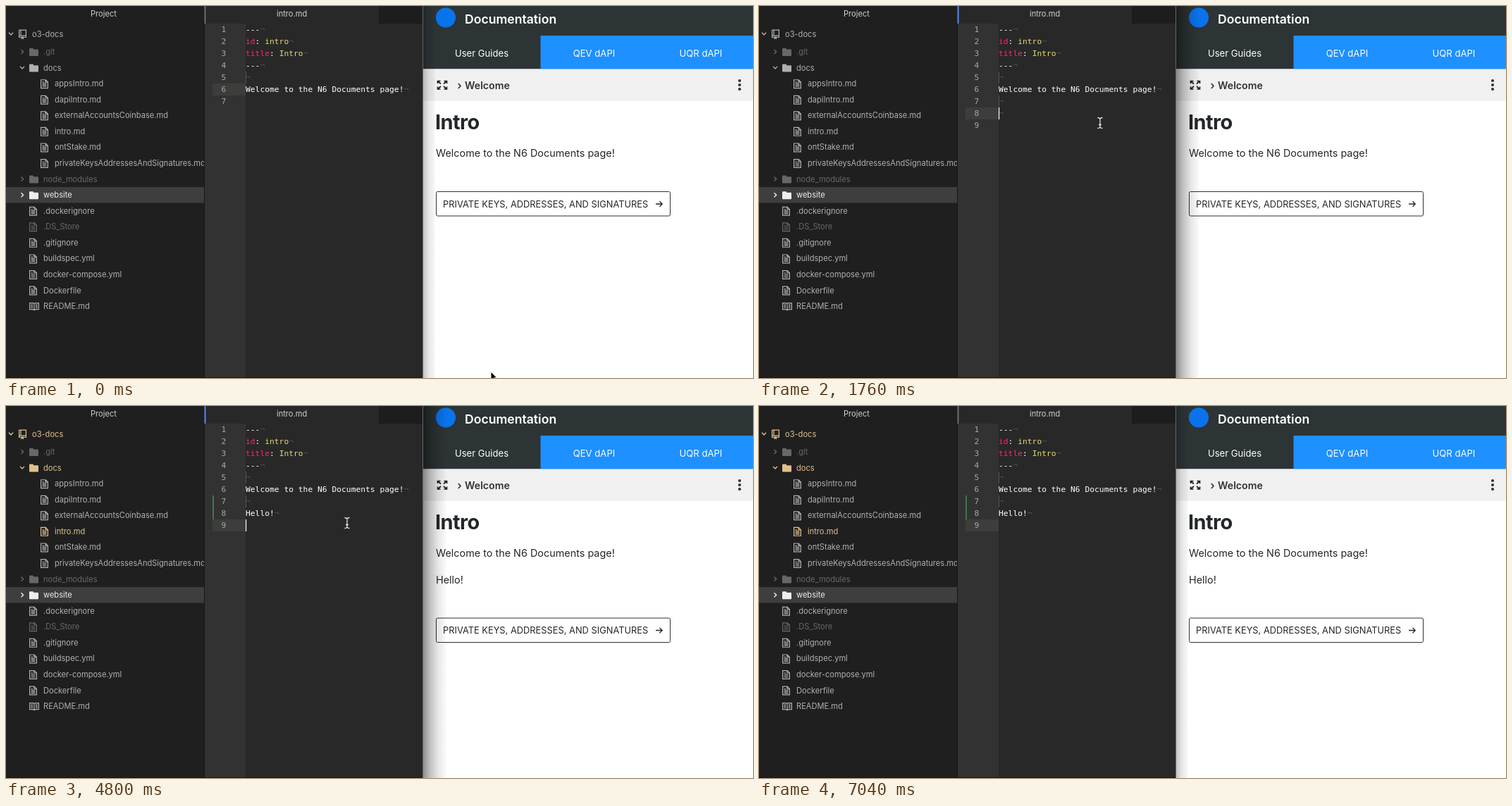
An HTML page that plays this animation: 1060 by 528 pixels, repeating every 7.12 s.

```html
<!DOCTYPE html>
<html lang="en">
<head>
<meta charset="utf-8">
<title>Live documentation preview</title>
<style>
  html, body { margin: 0; width: 100%; height: 100%; overflow: hidden; background: #fff; }
  svg { display: block; width: 1060px; height: 528px; }
  text { font-family: Inter, "Noto Sans", sans-serif; white-space: pre; }
  .ui { font-size: 11.1px; fill: #d0d0d0; }
  .code text { font-family: "DejaVu Sans Mono", monospace; font-size: 11.3px; fill: #fff; }
  .code .num { fill: #a8a8a8; text-anchor: middle; }
  .code .eol { fill: #505050; }
  .key { fill: #f92672; }
  .str { fill: #e6db74; }
  .row { color: #b0b0b0; }
  .row text { fill: currentColor; font-size: 11.1px; }
  .dim { color: #686868; }
  .sel { color: #eee; }
  .saved .mod { color: #e2c08d; }
  .page { fill: #23272a; font-size: 14.4px; }
  .tab { fill: #fff; font-size: 13.1px; text-anchor: middle; }
  .line { fill: none; stroke: currentColor; stroke-width: 1.2; }
</style>
</head>
<body>
<svg viewBox="0 0 1060 528">
  <defs>
    <linearGradient id="wide">
      <stop offset="0" stop-opacity=".44"/>
      <stop offset=".3" stop-opacity=".25"/>
      <stop offset=".65" stop-opacity=".1"/>
      <stop offset="1" stop-opacity=".02"/>
    </linearGradient>
    <linearGradient id="slim">
      <stop offset="0" stop-opacity=".24"/>
      <stop offset=".45" stop-opacity=".1"/>
      <stop offset="1" stop-opacity=".03"/>
    </linearGradient>
    <clipPath id="side"><path d="M0 0H281V528H0Z"/></clipPath>
    <path id="file" class="line" d="M.6 .6H7.2L10.4 3.8V12.4H.6Z M7 .8V4H10.2 M2.6 6H8.4 M2.6 8H8.4 M2.6 10H8.4 M2.6 4H5"/>
    <path id="folder" fill="currentColor" d="M0 2Q0 1 1 1H5Q6 1 6 2V2.6H12Q13 2.6 13 3.6V11Q13 12 12 12H1Q0 12 0 11Z"/>
    <path id="book" class="line" d="M.6 1.6H5.6L7 2.6L8.4 1.6H13.4V10.6H8.4L7 11.6L5.6 10.6H.6Z M7 2.6V11 M2.4 4H5 M2.4 6H5 M2.4 8H5 M9 4H11.6 M9 6H11.6 M9 8H11.6"/>
    <g id="repo">
      <path class="line" d="M.6 .6H10.4V11H7 M3 11H.6V.6 M3 .6V8.6 M.6 8.6H10.4"/>
      <path fill="currentColor" d="M3.4 10H7V14L5.2 12.6L3.4 14Z"/>
    </g>
    <path id="ibeam" d="M-3.5 -7.5Q0 -7.5 0 -5V5Q0 7.5 -3.5 7.5M3.5 -7.5Q0 -7.5 0 -5M0 5Q0 7.5 3.5 7.5M-2 2.5H2"/>
  </defs>

  <!-- file tree -->
  <path fill="#1f1f1f" d="M0 0H282V528H0Z"/>
  <path fill="#3e3e3e" d="M0 257H281V279.5H0Z"/>
  <text class="ui" x="120" y="15">Project</text>
  <g id="tree" clip-path="url(#side)"></g>

  <!-- editor -->
  <path fill="#282828" d="M282 0H592V528H282Z"/>
  <path fill="#1d1d1d" d="M530 0H592V25H530Z"/>
  <path fill="#323232" d="M282 25H340V528H282Z"/>
  <path fill="#171717" d="M281 0H282V528H281Z M529.5 0H530.5V25H529.5Z"/>
  <path id="edge" d="M281.5 0H283.5V25H281.5Z"/>
  <text class="ui" x="384" y="15">intro.md</text>
  <circle id="dirty" cx="516" cy="11.5" r="3.2" fill="#568af2"/>
  <g class="code">
    <rect id="active" x="293" width="47" height="17" fill="#3d3d3c"/>
    <path id="diff" fill="#43764a" d="M293 127H295V161H293Z"/>
    <g id="nums"></g>
    <g id="lines"></g>
    <rect id="caret" width="1.2" height="17" fill="#f8f8f0"/>
  </g>
  <path fill="#141414" d="M0 527H592V528H0Z"/>

  <!-- web page -->
  <path fill="#fff" d="M592 0H1060V528H592Z"/>
  <path fill="#2d3436" d="M592 0H1060V89.5H592Z"/>
  <path fill="#1e90ff" d="M758.5 42H1060V89.5H758.5Z"/>
  <path fill="#f0f0f0" d="M592 89.5H1060V134.5H592Z"/>
  <circle cx="624" cy="16.5" r="14" fill="#0a73eb"/>
  <text x="651" y="25" font-size="17.6" font-weight="600" fill="#fff">Documentation</text>
  <text class="tab" x="675" y="71.5">User Guides</text>
  <text class="tab" x="834.5" y="71.5">QEV dAPI</text>
  <text class="tab" x="986" y="71.5">UQR dAPI</text>
  <path fill="none" stroke="#222" stroke-width="1.7"
    d="M612.5 110V106.5H616.5M612.5 106.5L617 110.5 M625.5 110V106.5H621.5M625.5 106.5L621 110.5 M612.5 114.5V118H616.5M612.5 118L617 114 M625.5 114.5V118H621.5M625.5 118L621 114"/>
  <path fill="none" stroke="#333" stroke-width="1.7" d="M641.8 110L645 113.5L641.8 117"/>
  <text x="651" y="118" font-size="14.2" font-weight="600" fill="#333">Welcome</text>
  <g fill="#333"><circle cx="1041" cy="106" r="2.1"/><circle cx="1041" cy="112" r="2.1"/><circle cx="1041" cy="118" r="2.1"/></g>
  <text x="609" y="174.5" font-size="29" font-weight="700" letter-spacing="-.6" fill="#23272a">Intro</text>
  <text class="page" x="610" y="214">Welcome to the N6 Documents page!</text>
  <text class="page" id="hello" x="610" y="251.5">Hello!</text>
  <g id="next">
    <rect x="610.5" y="263.500" width="332" height="34.5" rx="2" fill="none" stroke="#2b3036"/>
    <text class="page" x="620" y="285.5" style="font-size:12.85px">PRIVATE KEYS, ADDRESSES, AND SIGNATURES</text>
    <path fill="none" stroke="#23272a" stroke-width="1.3" d="M922 281H931M927.5 277.3L931.2 281L927.5 284.7"/>
  </g>
  <path fill="#666" d="M591 0H592V528H591Z"/>
  <path id="focused" fill="url(#wide)" d="M592 0H624V528H592Z"/>
  <path id="blurred" fill="url(#slim)" d="M592 0H608.5V528H592Z"/>

  <!-- pointer -->
  <g id="mouse">
    <path id="arrow" fill="#000" stroke="#fff" d="M0 0V12L2.8 9.4L4.8 13.8L6.8 13L4.9 8.7H8.6Z"/>
    <g id="beam" fill="none">
      <use href="#ibeam" stroke="#222" stroke-width="3"/>
      <use href="#ibeam" stroke="#e4e4e4" stroke-width="1.3"/>
    </g>
    <path id="resize" fill="#000" stroke="#fff" stroke-width=".8" d="M-7 0L-2.8 -4.2V-1.3H2.8V-4.2L7 0L2.8 4.2V1.3H-2.8V4.2Z"/>
    <g id="ring" fill="none" stroke="#e8e8e8">
      <circle cx="3" r="16.3" stroke-width="1.3"/>
      <circle cx="3" r="14" stroke-width="1.6"/>
    </g>
  </g>
</svg>
<script>
const LOOP = 7120, STEP = 80, CHAR = 6.803;
const $ = id => document.getElementById(id);
const show = (id, on) => { $(id).style.display = on ? '' : 'none'; };
const passed = (times, t) => times.filter(x => x <= t).length;

// File tree: name, depth, icon, class, chevron
const chevrons = { open: 'M-3 -1.7L0 1.5L3 -1.7', shut: 'M-1.5 -3L1.6 0L-1.5 3' };
const files = [
  ['o3-docs', 0, 'repo', 'mod', 'open'],
  ['.git', 1, 'folder', 'dim', 'shut'],
  ['docs', 1, 'folder', 'mod', 'open'],
  ['appsIntro.md', 2, 'file'],
  ['dapiIntro.md', 2, 'file'],
  ['externalAccountsCoinbase.md', 2, 'file'],
  ['intro.md', 2, 'file', 'mod'],
  ['ontStake.md', 2, 'file'],
  ['privateKeysAddressesAndSignatures.md', 2, 'file'],
  ['node_modules', 1, 'folder', 'dim', 'shut'],
  ['website', 1, 'folder', 'sel', 'shut'],
  ['.dockerignore', 1, 'file'],
  ['.DS_Store', 1, 'file', 'dim'],
  ['.gitignore', 1, 'file'],
  ['buildspec.yml', 1, 'file'],
  ['docker-compose.yml', 1, 'file'],
  ['Dockerfile', 1, 'file'],
  ['README.md', 1, 'book']
];
$('tree').innerHTML = files.map(([name, depth, icon, cls = '', fold], i) => {
  const y = i ? 65 + 22.57 * (i - 1) : 39.5;
  const x = 37 + 16 * depth;
  return `<g class="row ${cls}">` +
    (fold ? `<path class="line" d="${chevrons[fold]}" style="stroke-width:1.4" transform="translate(${x - 30} ${y})"/>` : '') +
    `<use href="#${icon}" x="${x - (depth ? 20 : 19)}" y="${y - 6}"/>` +
    `<text x="${x}" y="${y + 4}">${name}</text></g>`;
}).join('');

// Editor text
const lineTop = n => 25 + 17 * (n - 1);
const baseline = n => lineTop(n) + 12;
const span = (cls, s) => `<tspan class="${cls}">${s}</tspan>`;
const eol = span('eol', '¬');
const intro = ['---', span('key', 'id') + ': ' + span('str', 'intro'),
  span('key', 'title') + ': ' + span('str', 'Intro'), '---', '', 'Welcome to the N6 Documents page!'];

function lineMarkup(s, i) {
  const n = i + 1;
  const guide = n < 8 && !s ? `<path fill="#555" d="M340 ${lineTop(n)}h1v17h-1Z"/>` : '';
  return `${guide}<text x="340" y="${baseline(n)}">${s}${eol}</text>`;
}

let drawn = '';
function drawCode(typed, count) {
  const state = typed + count;
  if (state === drawn) return;
  drawn = state;
  const lines = [...intro, '', typed, ''].slice(0, count - 1);
  $('lines').innerHTML = lines.map(lineMarkup).join('');
  $('nums').innerHTML = Array.from({ length: count }, (_, i) =>
    `<text class="num" x="${i < 9 ? 309 : 305.6}" y="${baseline(i + 1)}">${i + 1}</text>`).join('');
}

const typeTimes = [2400, 2560, 2880, 3040, 3200, 3760];
const caretFlips = [880, 1280, 1600, 2080, 2400, 3520, 3760, 4320, 4560, 4880, 5280, 5680, 6080, 6480, 6800, 7040];

// Pointer path: time, x, y
const moves = [
  [0, 688, 519], [80, 668, 488], [240, 603, 385], [320, 575, 339], [400, 575, 339],
  [640, 520, 250], [800, 491, 204], [880, 490, 202], [1040, 485, 171], [1120, 484, 166],
  [5600, 484, 166], [5680, 484, 167], [5840, 484, 167], [5920, 505, 180], [6080, 597, 271],
  [6240, 608, 350], [6480, 629, 489], [6560, 640, 560], [LOOP, 640, 560]
];
function pointerAt(t) {
  const i = moves.findIndex(m => m[0] > t);
  const [a, b] = [moves[i - 1], moves[i]];
  const k = (t - a[0]) / (b[0] - a[0]);
  return [1, 2].map(j => a[j] + (b[j] - a[j]) * k);
}

function render(t) {
  const typed = 'Hello!'.slice(0, passed(typeTimes, t));
  const row = 6 + passed([1600, 1760, 4080], t);
  const trimmed = t >= 4560;
  drawCode(typed, trimmed ? 9 : row + 1);

  const col = row === 6 ? 33 : row === 8 ? typed.length : 0;
  $('caret').setAttribute('x', 340 + col * CHAR - (col ? .6 : 0));
  $('caret').setAttribute('y', lineTop(row));
  show('caret', passed(caretFlips, t) % 2);
  $('active').setAttribute('y', lineTop(row));
  show('diff', t >= 2080);
  show('dirty', t >= 2080 && !trimmed);
  $('tree').classList.toggle('saved', t >= 4640);

  const focus = t >= 880 && t < 7040;
  $('edge').setAttribute('fill', focus ? '#568af2' : '#6e6e6e');
  show('focused', focus);
  show('blurred', !focus);

  const updated = t >= 4800;
  show('hello', updated);
  $('next').setAttribute('transform', `translate(0 ${updated ? 37.5 : 0})`);

  const [x, y] = pointerAt(t);
  $('mouse').setAttribute('transform', `translate(${x} ${y})`);
  show('beam', x < 588);
  show('resize', x >= 588 && x < 602);
  show('arrow', x >= 602);
  show('ring', t >= 800 && t < 960);
}

function tick() {
  const t = performance.now() % LOOP;
  render(Math.floor(t / STEP) * STEP);
  requestAnimationFrame(tick);
}
tick();
</script>
</body>
</html>
```
